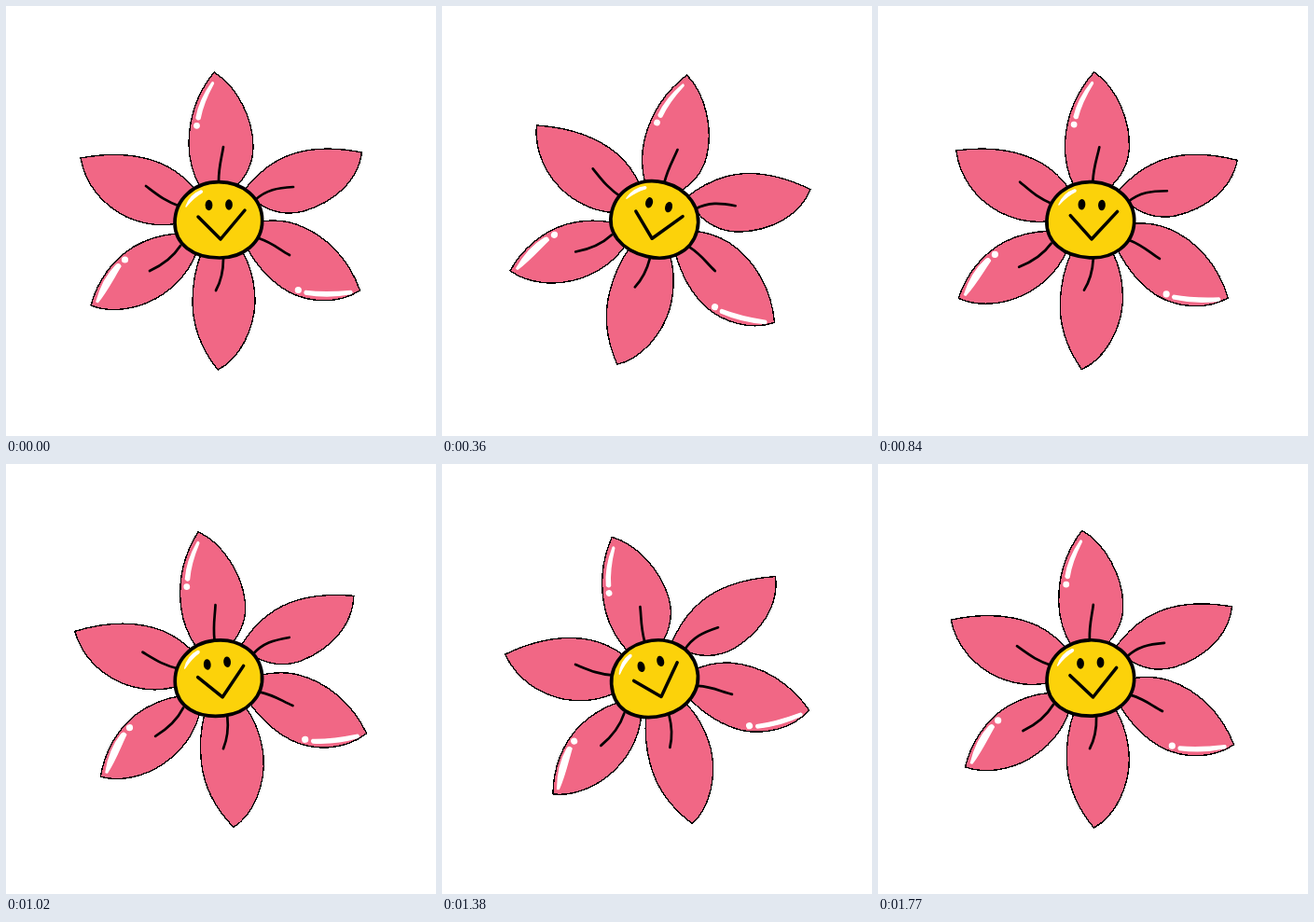
An HTML page for the animation above (1800 ms loop, 461 px wide and 461 px high).

```html
<!DOCTYPE html>
<html lang="en">
<head>
<meta charset="utf-8">
<title>Swaying flower</title>
<style>
  html, body { margin: 0; width: 100%; height: 100%; overflow: hidden; background: #fff; }
  svg { display: block; width: 100vw; height: 100vh; }
  .petals { fill: #f16785; stroke: #000; stroke-width: 1.4; stroke-linejoin: round; shape-rendering: crispEdges; }
  .ink { fill: none; stroke: #000; stroke-width: 2.7; stroke-linecap: round; stroke-linejoin: round; }
  .face { fill: #fcd20a; stroke: #000; stroke-width: 3.7; }
  .smile { stroke-width: 3.5; }
  .shine { fill: #fff; stroke: #fff; stroke-width: 1.4; stroke-linejoin: round; }
</style>
</head>
<body>
<svg viewBox="0 0 461 461">
  <g id="flower">
    <g class="petals">
      <path d="M223 71C204 95 196 122 196 148C196 165 200 180 209 196L244 196C258 183 265 168 265 151C265 121 248 86 223 71Z"/>
      <path d="M381.500 157C346 150 314 152 289 167C275 175 265 185 254 199L264 206C280 221 300 225 319 220C350 211 377 189 381.500 157Z"/>
      <path d="M379.500 305C368 272 343 245 311 234C299 230 287 229 272 231L258 259C270 280 284 296 304 307C326 318 356 320 379.500 305Z"/>
      <path d="M227 390C209 367 200 342 200 317C200 299 203 282 209 266L252 261C263 279 267 298 267 318C266 346 251 378 227 390Z"/>
      <path d="M91 321C98 295 114 272 137 258C151 250 167 245 184 244L203 267C195 286 180 303 160 314C138 326 111 329 91 321Z"/>
      <path d="M80 163C112 157 145 158 173 172C184 178 194 186 202 196L184 233C165 237 147 234 129 226C103 213 85 191 80 163Z"/>
    </g>
    <g class="ink">
      <path d="M233 151C231 164 228 172 228 188"/>
      <path d="M308 194C291 195 279 197 267 208"/>
      <path d="M304 267C293 261 286 254 271 249"/>
      <path d="M225 305C231 294 233 285 233 271"/>
      <path d="M154 284C167 278 178 271 187 257"/>
      <path d="M150 193C162 202 170 209 187 215"/>
    </g>
    <path class="face" d="M228 188.700C254 188.700 274.700 206 274.700 230C274.700 254 254 270 229 270C200 270 181 255 181 232.500C181 207 202 188.700 228 188.700Z"/>
    <ellipse cx="217.500" cy="213.500" rx="3.900" ry="5.800"/>
    <ellipse cx="239" cy="213" rx="3.900" ry="5.800"/>
    <path class="ink smile" d="M206 226L230 250L256 219"/>
    <g class="shine">
      <path d="M221 82C213 93 206.500 106 204 120Q205.500 123 208 121C210.500 107 216 95 222.500 83Q222 81 221 82Z"/>
      <circle cx="204.500" cy="128.300" r="2.700"/>
      <path d="M97 317C101 302 108 288 118 278Q121 275 123 279C115 292 108 306 98.500 317.500Z"/>
      <circle cx="127.500" cy="272" r="2.900"/>
      <path d="M321 305.500C337 307.500 354 307 370 305.500Q372 307 370 308.500C354 311.500 336 311.500 321 309Q319 307 321 305.500Z"/>
      <circle cx="313.300" cy="304.500" r="2.900"/>
      <path d="M193 215C196 207 201 201 209 198Q211 198 210 200C203 204 198 209 193 215Z"/>
    </g>
  </g>
</svg>
<script>
  const PERIOD = 1800, STEP = 30, SWING = 15, CENTER = 230.5;
  const flower = document.getElementById("flower");
  const start = performance.now();

  function draw(ms) {
    const t = Math.floor(ms / STEP) * STEP % PERIOD;
    const angle = SWING * Math.sin(2 * Math.PI * t / PERIOD);
    flower.setAttribute("transform", `rotate(${angle} ${CENTER} ${CENTER})`);
  }

  function tick() {
    draw(performance.now() - start);
    requestAnimationFrame(tick);
  }
  tick();
</script>
</body>
</html>
```
